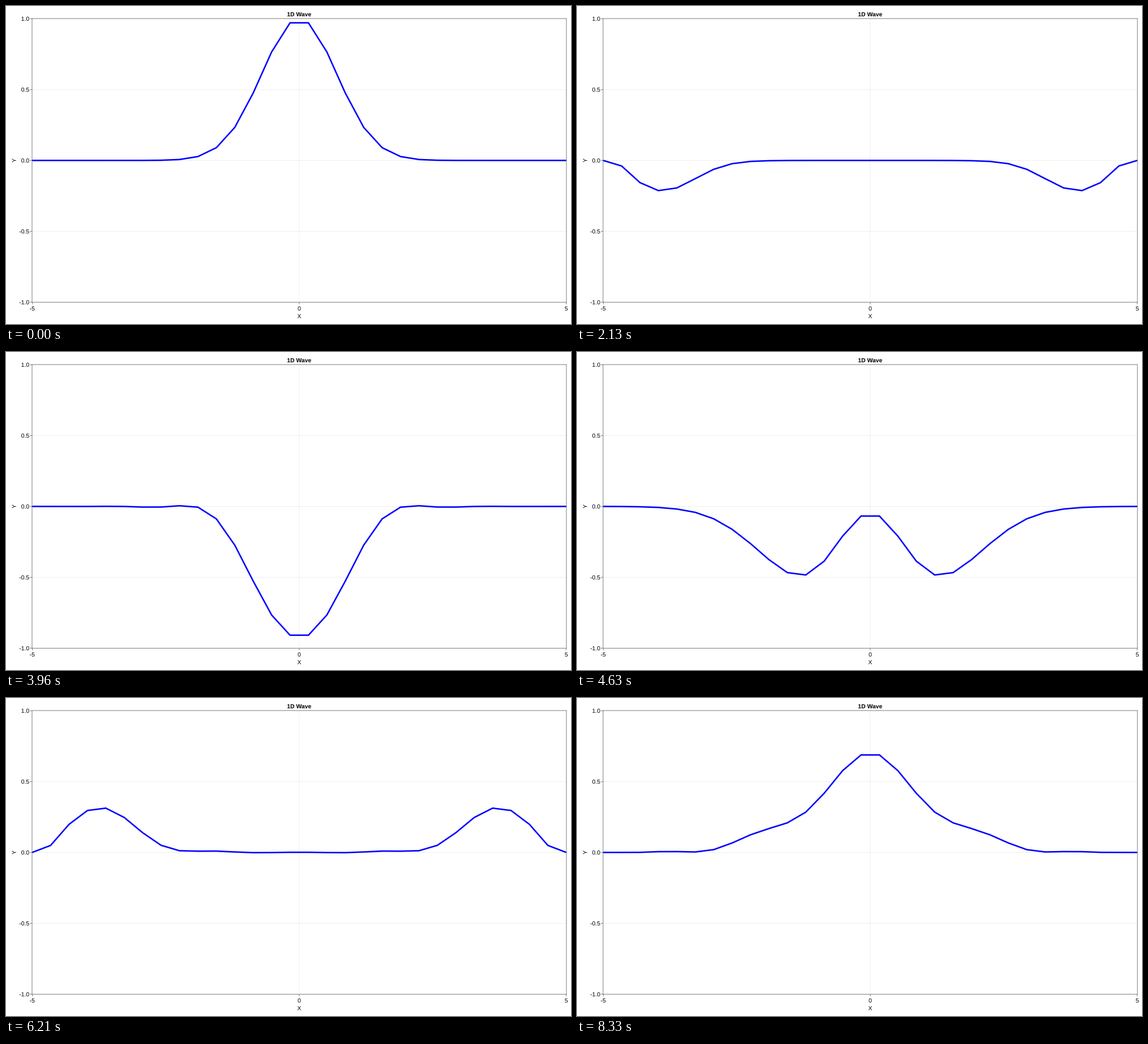
Recreate the animation shown at these times as a matplotlib script. Size 998 px wide and 561 px high, loop 8370 ms.

```python
import numpy as np
import matplotlib.pyplot as plt
from matplotlib.animation import FuncAnimation
from matplotlib.patches import PathPatch
from matplotlib.textpath import TextPath
from matplotlib.transforms import Affine2D

W, H, DPI = 998, 561, 64
SCENE_W, SCENE_H = 1920, 1080       # layout units
UNIT = W / SCENE_W * 72 / DPI       # points per layout unit
LEFT, RIGHT, TOP, BOTTOM = 89, 1904, 43, 1006
FONT_SIZE = 20
TICK_MS, FRAMES = 30, 279
FPS, DT = 24, 0.1

plt.rcParams["path.snap"] = False

# Wave equation on 30 nodes: zero value and zero one-sided slope at both ends,
# which ties the second node to a quarter of the third.
x = np.linspace(-5, 5, 30)
dx = x[1] - x[0]
start = np.exp(-x[2:-2] ** 2)
n = len(start)
stiff = 2 * np.eye(n) - np.eye(n, k=1) - np.eye(n, k=-1)
stiff[0, 0] = stiff[-1, -1] = 1.75
lam, modes = np.linalg.eigh(stiff / dx ** 2)
omega = np.sqrt(lam)
weights = modes.T @ start


def wave(t):
    u = modes @ (weights * np.cos(omega * t))
    return np.concatenate([[0, u[0] / 4], u, [u[-1] / 4, 0]])


def to_x(v):
    return LEFT + (v + 5) / 10 * (RIGHT - LEFT)


def to_y(v):
    return TOP + (1 - v) / 2 * (BOTTOM - TOP)


fig = plt.figure(figsize=(W / DPI, H / DPI), dpi=DPI, facecolor="white")
ax = fig.add_axes([0, 0, 1, 1])
ax.set(xlim=(0, SCENE_W), ylim=(SCENE_H, 0))
ax.axis("off")


def rule(xs, ys, z=3, **style):
    style = {"color": "black", "linewidth": UNIT, **style}
    ax.plot(xs, ys, zorder=z, solid_capstyle="butt",
            solid_joinstyle="miter", **style)


def label(px, py, text, align="center", angle=0, weight="normal"):
    """Place text with its baseline at py (or at px when turned)."""
    path = TextPath((0, 0), text, size=FONT_SIZE,
                    prop={"family": "Liberation Sans", "weight": weight})
    box = path.get_extents()
    shift = box.x1 if align == "right" else (box.x0 + box.x1) / 2
    place = (Affine2D().translate(-shift, 0).rotate_deg(angle)
             .scale(1, -1).translate(px, py))
    ax.add_patch(PathPatch(path, facecolor="black", linewidth=0, zorder=4,
                           transform=place + ax.transData))


for v in (-5, 0, 5):
    rule([to_x(v)] * 2, [BOTTOM + 1, BOTTOM + 7])
    label(to_x(v), 1034.3, str(v))
for v in (-1, -0.5, 0, 0.5, 1):
    rule([LEFT - 7, LEFT - 1], [to_y(v)] * 2)
    label(78.4, to_y(v) + 7.2, f"{v:.1f}", align="right")

grid = {"z": 1, "alpha": 0.12}
rule([to_x(0)] * 2, [TOP, BOTTOM], **grid)
for v in (-0.5, 0, 0.5):
    rule([LEFT, RIGHT], [to_y(v)] * 2, **grid)

l, r, t, b = LEFT - 0.5, RIGHT + 0.5, TOP - 0.5, BOTTOM + 0.5
rule([l, r, r, l, l, l], [t, t, b, b, t, t])

label(to_x(0), 35, "1D Wave", weight="bold")
label(to_x(0), 1060.3, "X")
label(34.2, to_y(0), "Y", angle=90)

line, = ax.plot(to_x(x), to_y(wave(0)), color="#0000ff", linewidth=5 * UNIT,
                solid_joinstyle="miter", solid_capstyle="butt", zorder=2)


def update(i):
    step = int((i * TICK_MS + 25) * FPS / 1000)
    line.set_ydata(to_y(wave(step * DT)))
    return line,


anim = FuncAnimation(fig, update, frames=FRAMES, interval=TICK_MS,
                     repeat=True, repeat_delay=0)
plt.show()
```
